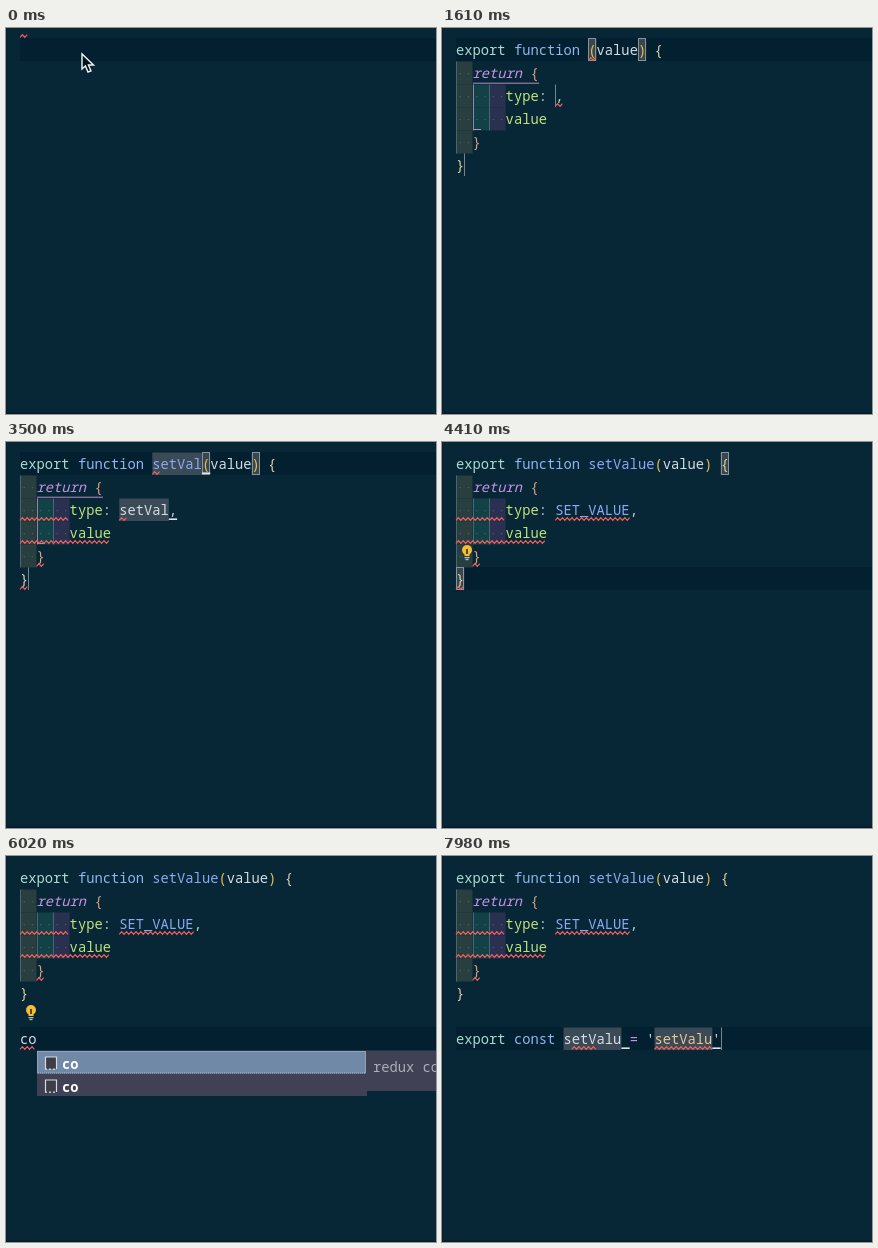
Animation, 430 px wide and 386 px high, one loop 8000 ms. Source, as an HTML page with a canvas:

```html
<!DOCTYPE html>
<html lang="en">
<head>
<meta charset="utf-8">
<title>Snippet typing</title>
<style>
html, body { margin: 0; width: 100%; height: 100%; overflow: hidden; background: #072636; }
canvas { display: block; }
</style>
</head>
<body>
<canvas id="stage" width="430" height="386"></canvas>
<script>
const ctx = document.getElementById('stage').getContext('2d');
const LOOP = 8000, LEFT = 14, CHAR = 8.27, ROW = 23;
const MONO = '"Noto Sans Mono", monospace';
const SIZE = '13.78px ';
const C = {
  bg: '#072636', line: '#032031', red: '#ef5f5c', keyword: '#a9dccf', decl: '#8fb6ee',
  name: '#8ca9f2', plain: '#d6dde2', key: '#c0e27c', ret: '#c592e4', punct: '#b9cbd0',
  gold: '#e8bd55', brace: '#e0d3a3', inner: '#d7a27e', str: '#e6c792', guide: '#4b6670'
};

// Times at which things happen (ms)
const EXPAND = 1120, LEAVE = 4130, NEWLINE = 4690, NEWLINE2 = 4830, CONST = 6230;
const NAME_KEYS = [2660, 2800, 2940, 3150, 3290, 3430, 3640, 3850];
const CONST_KEYS = [7070, 7350, 7490, 7560, 7700, 7840, 7910];
const WORD_KEYS = [5530, 5670];
const BLINKS = [70, 560, 1050, 1540, 2030, 2520, 2660, 4340, 4690, 5250, 5530, 5950, 6230, 6720, 7040];

const col = c => LEFT + c * CHAR;
const mid = r => 22 + r * ROW;
const rowTop = r => 10.5 + r * ROW;
const typed = (keys, t) => keys.filter(k => k <= t).length;
const within = (t, a, b) => t >= a && t < b;

function rect(x, y, w, h, color) {
  ctx.fillStyle = color;
  ctx.fillRect(x, y, w, h);
}

function text(r, c, tokens) {
  for (const [s, color, style = ''] of tokens) {
    ctx.font = style + ' ' + SIZE + MONO;
    ctx.fillStyle = color;
    ctx.fillText(s, col(c), mid(r) + 5);
    c += s.length;
  }
}

function squiggle(r, from, to) {
  const x1 = col(to), y = mid(r) + 9;
  ctx.strokeStyle = C.red;
  ctx.lineWidth = 1.2;
  ctx.beginPath();
  for (let x = col(from), up = 0; x <= x1; x += 2.4, up ^= 1) ctx.lineTo(x, y + (up ? -1.3 : 1.3));
  ctx.stroke();
}

// Highlighted placeholder; an empty one shows as a thin bar
function field(r, c, n) {
  if (n) rect(col(c), rowTop(r), n * CHAR, ROW - .5, '#3a4a57');
  else rect(Math.round(col(c)), rowTop(r), 1, ROW - .5, '#74858e');
}

function matchBox(r, c) {
  rect(col(c), rowTop(r), CHAR, ROW - .5, '#38474d');
  ctx.strokeStyle = '#89939a';
  ctx.lineWidth = 1;
  ctx.strokeRect(Math.round(col(c)) + .5, rowTop(r), 7, ROW - 1);
}

function caretAlpha(t) {
  const i = typed(BLINKS, t);
  const k = i ? Math.min(1, (t - BLINKS[i - 1]) / 70) : 1;
  return i % 2 ? k : 1 - k;
}

function carets(t, places) {
  ctx.globalAlpha = caretAlpha(t);
  for (const [r, c] of places) rect(col(c), mid(r) + 8.4, CHAR, 1.6, '#dce7ec');
  ctx.globalAlpha = 1;
}

function indents(scope) {
  const tints = ['#293e3f', '#124147', '#2a3050'];
  const depth = [1, 3, 3, 1];
  depth.forEach((d, i) => {
    for (let k = 0; k < d; k++) {
      rect(col(k * 2), rowTop(i + 1), CHAR * 2, ROW, tints[k]);
      for (let j = 0; j < 2; j++) rect(col(k * 2 + j) + 3.6, mid(i + 1), 1.2, 1.2, '#49636b');
    }
  });
  rect(14, rowTop(1), 1, ROW * 4, C.guide);
  rect(31, rowTop(2), 1, ROW * 2, scope ? '#9586a6' : C.guide);
  rect(47, rowTop(2), 1, ROW * 2, C.guide);
  if (scope) {
    rect(31, 54.7, 66, 1, '#b58cc0');
    rect(31, 101, 8, 1, '#b58cc0');
  }
}

function bulb(r) {
  const y = mid(r) - 6;
  ctx.fillStyle = '#f4bd35';
  ctx.beginPath();
  ctx.arc(25, y, 5, 0, 7);
  ctx.fill();
  rect(22.5, y + 3, 5, 3, '#f4bd35');
  rect(24, y - 1, 2, 5, '#5a4a22');
  rect(22.5, y + 7, 5, 1.3, '#b8bec0');
  rect(23.5, y + 9, 3, 1.2, '#b8bec0');
}

function mouse() {
  ctx.beginPath();
  const pts = [76, 26, 76, 41, 79.4, 38, 82, 44, 85, 42.8, 82.4, 37, 87.5, 37];
  for (let i = 0; i < pts.length; i += 2) ctx.lineTo(pts[i], pts[i + 1]);
  ctx.closePath();
  ctx.fillStyle = '#05121a';
  ctx.fill();
  ctx.strokeStyle = '#f2f5f6';
  ctx.lineWidth = 1.4;
  ctx.stroke();
}

function action(t) {
  const n = typed(NAME_KEYS, t);
  const name = 'setValue'.slice(0, n);
  const editing = t < LEAVE;
  indents(editing);

  if (editing) {
    field(0, 16, n);
    field(2, 12, n);
    field(5, 1, 0);
    matchBox(0, 16 + n);
    matchBox(0, 22 + n);
  } else if (t >= 4200 && t < NEWLINE) {
    matchBox(0, 32);
    matchBox(5, 0);
  }

  text(0, 0, [['export ', C.keyword], ['function ', C.decl], [name, C.name], ['(', C.gold],
    ['value', C.plain], [')', C.gold], [' {', C.brace]]);
  text(1, 2, [['return', C.ret, 'italic'], [' {', C.inner]]);
  text(2, 6, [['type', C.key], [': ', C.punct],
    [editing ? name : 'SET_VALUE', editing ? C.plain : C.name], [',', C.punct]]);
  text(3, 6, [['value', C.key]]);
  text(4, 2, [['}', C.inner]]);
  text(5, 0, [['}', C.brace]]);

  if (editing && t >= 1400) {
    squiggle(0, 16, 17);
    squiggle(2, 12, 13);
  }
  const clean = within(t, 5250, 5600) || within(t, 6440, 7700);
  if (t >= 2800 && !clean) {
    squiggle(2, 0, 6);
    if (!editing) squiggle(2, 12, 21);
    squiggle(3, 0, 11);
    squiggle(4, 2, 3);
    if (t < NEWLINE) squiggle(5, 0, 1);
  }
  if (editing) carets(t, [[0, 16 + n], [2, 12 + n]]);
}

function popup(t) {
  rect(31, 194.5, 330, 45.5, '#404154');
  rect(31, 195, 329, 22.5, '#7089a6');
  ctx.strokeStyle = '#a9bac9';
  ctx.lineWidth = 1;
  ctx.setLineDash([1, 1]);
  ctx.strokeRect(31.5, 195.5, 328, 21.5);
  ctx.setLineDash([]);
  for (let i = 0; i < 2; i++) {
    const y = 207 + i * ROW;
    rect(39, y - 6, 12, 12, '#3c3d46');
    ctx.strokeStyle = '#d5d9dc';
    ctx.lineWidth = 1.2;
    ctx.beginPath();
    ctx.moveTo(39.5, y + 6);
    ctx.lineTo(39.5, y - 6);
    ctx.lineTo(50.5, y - 6);
    ctx.lineTo(50.5, y + 6);
    ctx.stroke();
    for (let x = 39; x < 51; x += 4) rect(x, y + 5.5, 2, 1.3, '#d5d9dc');
    ctx.font = 'bold ' + SIZE + MONO;
    ctx.fillStyle = '#fff';
    ctx.fillText('co', 56, y + 5.5);
  }
  if (t < 5880) return;
  rect(361, 194.5, 69, 40.5, '#404154');
  ctx.font = SIZE + MONO;
  ctx.fillStyle = '#a9afba';
  ctx.fillText('redux constant', 367, 216);
}

function constant(t) {
  const n = typed(CONST_KEYS, t);
  const name = 'setValue'.slice(0, n);
  const second = 17 + n;
  field(7, 13, n);
  field(7, second, n);
  field(7, second + n + 1, 0);
  text(7, 0, [['export ', C.keyword], ['const ', C.decl], [name, C.plain], [' = ', C.ret],
    ["'", C.plain], [name, C.str], ["'", C.plain]]);
  if (n === 1) {
    squiggle(7, 15, 16);
    squiggle(7, 17, 20);
  } else if (n) {
    squiggle(7, 14, Math.min(13 + n, 17));
    squiggle(7, second, second + n);
  }
  carets(t, [[7, 13 + n], [7, second + n]]);
}

function draw(t) {
  rect(0, 0, 430, 386, C.bg);
  const row = t < LEAVE ? 0 : t < NEWLINE ? 5 : t < NEWLINE2 ? 6 : 7;
  rect(LEFT, rowTop(row) - .5, 430, ROW, C.line);

  if (t < EXPAND) {
    squiggle(-1, 0, 1);
    if (t < 1050) mouse();
    else text(0, 0, [['ac', C.plain]]);
    carets(t, [[0, t < 1050 ? 0 : 2]]);
  } else {
    action(t);
  }

  if (within(t, 4340, NEWLINE)) bulb(4);
  if (within(t, 4970, 7350)) bulb(6);

  if (t >= CONST) {
    constant(t);
  } else if (t >= LEAVE) {
    const word = 'co'.slice(0, typed(WORD_KEYS, t));
    if (word) {
      text(7, 0, [[word, C.plain]]);
      squiggle(7, 0, word.length);
    }
    carets(t, [[row, word.length]]);
    if (t >= 5740) popup(t);
  }

  rect(0, 384.5, 430, 1.5, '#041c2b');
  rect(0, 0, 1, 386, '#06202f');
}

function frame() {
  draw(performance.now() % LOOP);
  requestAnimationFrame(frame);
}
frame();
</script>
</body>
</html>
```
